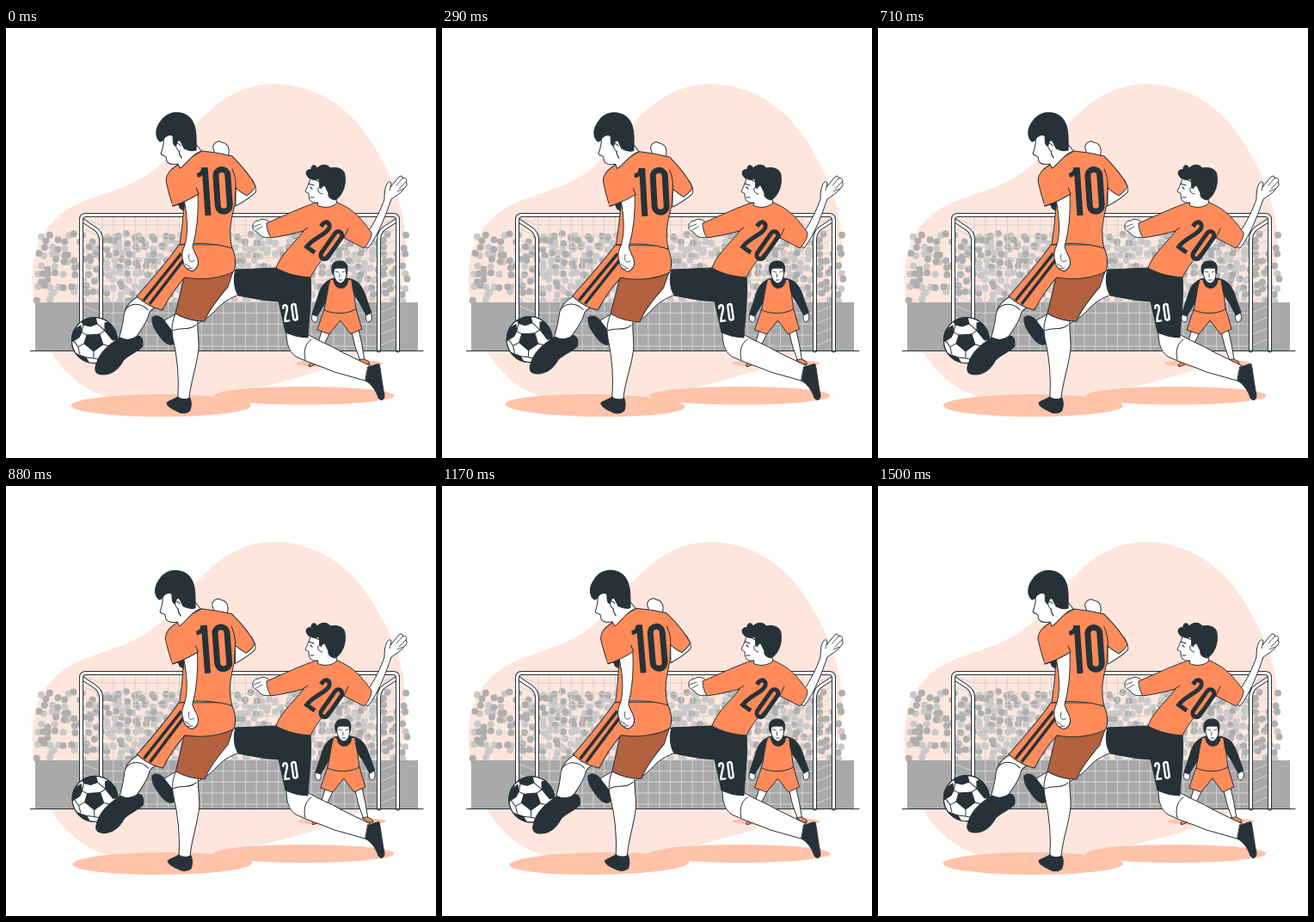
Animation, 500 px wide and 500 px high, one loop 1540 ms. Source, as an HTML page:

```html
<!DOCTYPE html>
<html lang="en">
<head>
<meta charset="utf-8">
<title>Football match</title>
<style>
  html, body { margin: 0; width: 100%; height: 100%; overflow: hidden; background: #fff; }
  svg { display: block; width: 100vw; height: 100vh; }
  .l { fill: none; }
  .w { fill: #fff; }
  .o { fill: #ff8b5a; }
  .d { fill: #263238; }
  .sh { fill: #ffc3aa; stroke: none; }
  .tube { fill: none; stroke: #263238; stroke-width: 5; }
  .tube.in { stroke: #fff; stroke-width: 3; }
  .num { fill: none; stroke: #263238; stroke-linejoin: miter; stroke-linecap: butt; }
</style>
</head>
<body>
<svg viewBox="0 0 500 500" stroke="#263238" stroke-width="1" stroke-linejoin="round" stroke-linecap="round">
  <defs>
    <symbol id="two" overflow="visible"><path d="M-4.500-11V-14C-4.500-21 4.500-21 4.500-13C4.500-5-4.500 7-4.500 18H7"/></symbol>
    <symbol id="zero" overflow="visible"><rect x="-4.500" y="-18.500" width="9" height="37" rx="4.500"/></symbol>
    <clipPath id="ballClip"><circle cx="103" cy="363.300" r="26.600"/></clipPath>
    <g id="frame">
      <path d="M88 223L103 233Q110.500 238 110.500 246V375M455 223L441 232Q433.500 237 433.500 246V375"/>
    </g>
    <path id="front" d="M87.500 375V223Q87.500 217.500 93 217.500H450Q455.500 217.500 455.500 223V375"/>
  </defs>

  <path fill="#ffe6dd" stroke="none" d="M312 65C368 65 409 102 431 143C452 180 465 214 465 255C465 300 452 345 420 372C390 395 345 405 290 419C238 433 172 441 122 430C84 421 58 392 45 361C34 336 29 306 31 281C34 244 53 216 91 201C125 188 158 182 184 154C216 120 249 65 312 65Z"/>

  <g id="crowd" stroke="none"></g>
  <path fill="#a9a9a9" stroke="none" d="M34 319H479V375H34Z"/>
  <path id="net" class="l" stroke="#d2d2d2" stroke-width="1"/>

  <use href="#frame" class="tube"/>
  <use href="#frame" class="tube in"/>
  <use href="#front" class="tube"/>
  <use href="#front" class="tube in"/>
  <path d="M28.500 375.500H485"/>

  <g id="keeper">
    <ellipse class="sh" cx="387" cy="390" rx="51" ry="4.500"/>
    <path class="w" d="M368 350L363 366L358 387L363 388L368 372L377 354ZM402 353L406 370L412 387L417 386L414 368L410 350Z"/>
    <path class="o" d="M358 386L352 392L353 394L360 391L363 388ZM411 386L417 391L423 391L422 388L417 385Z"/>
    <path class="w" d="M357 332C354 337 356 342 360 342C363 341 363 337 362 334ZM424 331C427 336 425 342 421 342C418 340 418 336 419 333Z"/>
    <path class="d" d="M382 291C370 294 366 301 363 312L356 333L362 335L371 320L377 306H402L411 319L419 334L425 331L418 311C414 300 410 293 397 291Z"/>
    <path class="o" d="M370 327L362 351L376 356L389 340L401 356L414 350L407 326Z"/>
    <path class="o" d="M377 293C374 303 374 308 372 318L370 328C382 333 396 333 407 327L405 310C403 303 403 299 402 293L398 292C398 306 381 306 381 292Z"/>
    <path class="w" d="M381 279C380 289 384 296 389 297C394 296 397 289 396 279L389 275Z"/>
    <path class="d" d="M380 286C377 277 380 271 388 271C396 270 399 277 396 286L395 279C390 280 386 278 382 280Z"/>
    <path class="l" d="M383 283L387 284M391 284L394 283M388 286V290M387 293H391" stroke-width=".8"/>
  </g>

  <g id="defender">
    <ellipse class="sh" cx="346.500" cy="427.500" rx="105" ry="10.500"/>
    <path class="w" d="M271 281L245 284L215 322L184 340L194 358C213 349 231 341 242 330C251 319 262 313 272 310Z"/>
    <path class="d" d="M170 337C173 333 179 335 182 338L193 352C196 358 198 364 195 367C191 371 184 366 179 359C174 352 169 346 170 337Z"/>
    <path class="w" d="M326 354C326 365 328 376 337 382C351 389 366 393 382 400L421 411L426 394L389 376C376 368 363 364 352 357Z"/>
    <path class="l" d="M355 362C347 367 346 378 348 386"/>
    <path class="d" d="M421 394C426 394 430 390 434 391C436 399 436 405 440 427C440 433 436 434 433 430C430 421 425 414 418 410Z"/>
    <path class="d" d="M314 279L267 281C264 291 265 303 270 311C285 314 300 317 317 318L325 354Q338 360 351 360C352 338 356 314 354 288Z"/>
    <path class="w" d="M421 237C428 227 436 211 440 199C440 190 441 184 444 180C447 177 449 180 447 185L457 173C460 171 462 173 461 175C465 173 467 177 465 179C468 182 464 186 462 188C458 193 453 195 448 199C442 216 434 239 421 256L410 250Z"/>
    <path class="l" d="M461 175L454 183M465 179L457 187M462 187L455 190M447 185L446 189" stroke-width=".8"/>
    <path class="w" d="M307 226C302 222 298 221 294 224C289 224 286 228 287 232C287 236 291 236 293 238C296 243 302 245 309 243Z"/>
    <path class="l" d="M288 231L296 228M291 235L298 231" stroke-width=".8"/>
    <path class="o" d="M361 203C344 208 322 219 303 227C303 233 305 239 308 244C322 242 335 239 346 236C336 250 320 262 314 279C326 286 340 289 354 290C361 275 376 259 393 244L416 256C421 251 425 245 425 238C414 223 406 211 383 202Z"/>
    <path class="l" d="M344 237L351 232M393 244L398 233"/>
    <path class="w" d="M354 174C353 181 349 187 348 190C349 192 352 191 352 193C352 200 354 204 363 203L362 206C369 210 380 209 385 203L381 188Z"/>
    <path class="d" d="M352 174C346 169 350 163 355 165C354 160 359 157 362 163C367 157 375 159 377 163C384 161 394 164 394 171C396 183 391 195 383 200C377 199 374 196 375 192L372 186C370 180 367 186 366 187C363 184 366 179 363 175C360 178 355 176 352 174Z"/>
    <path class="w" d="M367 187C361 181 361 193 368 193"/>
    <path class="l" d="M352 181L358 183M354 185L356 187M354 197H358" stroke-width="1.200"/>
    <g class="num" stroke-width="5" transform="translate(371 247.500) rotate(35)"><use href="#two" x="-9"/><use href="#zero" x="9"/></g>
    <g class="num" style="stroke:#fff" stroke-width="5" transform="translate(330.500 331) rotate(-8) scale(.5)"><use href="#two" x="-10"/><use href="#zero" x="10"/></g>
  </g>

  <g id="striker">
    <ellipse class="sh" cx="180.500" cy="439" rx="104.500" ry="13"/>
    <circle class="w" cx="103" cy="363.300" r="26.600"/>
    <g clip-path="url(#ballClip)">
      <path class="l" d="M94 357L88 354M109 356L115 352M113 368L121 370M102 376L102 384M91 367L84 371M88 354L90 345M106 344L115 352M79 364L84 371L86 379M121 370L119 379L111 386M93 383L102 384L111 386"/>
      <path class="d" d="M94 357L109 356L113 368L102 376L91 367ZM88 341L96 336H104L106 344L98 347L90 345ZM77 352L87 346L88 354L85 360L77 365ZM115 343L120 342L130 354V362L124 363L115 352ZM82 379L93 383L97 390L86 388ZM111 386L119 379L128 374L120 392Z"/>
    </g>
    <circle class="l" cx="103" cy="363.300" r="26.600"/>

    <path class="w" d="M198 330C193 340 192 350 194 360C199 381 202 401 200 431L213 432C214 413 222 394 224 374C225 363 222 352 223 338Z"/>
    <path class="l" d="M194 352C202 347 212 353 221 345"/>
    <path class="d" d="M200 429C205 433 210 432 214 430C216 435 216 440 214 445C209 449 203 448 198 445C193 443 188 440 187 436C190 433 196 432 200 429Z"/>
    <path class="w" d="M154 312C145 317 138 324 137 335C136 346 133 355 130 366L148 365C154 354 164 344 166 333C167 329 170 327 173 325Z"/>
    <path class="l" d="M138 329C144 319 157 319 165 328"/>
    <path class="d" d="M133 360C139 364 148 362 153 358C158 358 160 363 159 370C153 377 144 379 137 386C132 395 125 403 113 403C105 403 102 399 105 391C108 380 116 370 133 360Z"/>

    <path fill="#b3613f" d="M208 286L197 332Q212 341 231 341C235 329 246 315 258 301L267 274Z"/>
    <path class="o" d="M201 252C188 271 169 293 152 312Q166 325 182 328C189 314 199 300 208 290C229 294 252 290 265 283C268 274 267 263 261 252Z"/>
    <path d="M204 262L160 317M210 265L167 321" stroke-width="3.500" stroke-linecap="butt"/>

    <path class="w" d="M242 147C244 143 239 141 241 136C244 131 248 131 251 133C257 134 261 139 258 149Z"/>
    <path class="w" d="M286 176C290 183 292 188 290 191C284 197 276 202 267 207L267 187Z"/>
    <path class="o" d="M206 155C197 161 186 166 186 178C188 188 191 198 194 207L207 203C206 222 204 239 202 252C220 249 244 250 263 256C258 237 262 222 266 205L267 186C272 190 276 193 280 195C284 192 288 188 290 184C283 169 271 157 263 149C251 146 239 144 228 143Z"/>
    <path class="l" d="M267 187C268 177 266 171 263 164M207 203C211 195 210 188 206 183"/>
    <path class="d" d="M200 205L208 202L207 213L202 210Z" stroke="none"/>
    <path class="w" d="M207 200C211 220 212 238 208 252C204 260 204 266 206 271C206 277 211 281 216 283C222 281 225 275 223 269C222 264 218 260 217 254C222 236 224 215 223 192Z"/>
    <path class="l" d="M213 263C211 271 215 274 219 270M208 274L214 278M211 280L217 279" stroke-width=".8"/>
    <path class="o" d="M193 206C203 204 214 199 224 193L219 180L196 185Z" stroke="none"/>
    <path class="l" d="M194 207C204 204 214 199 224 193L221 186"/>

    <path class="w" d="M183 127C184 136 182 141 180 146C181 149 185 148 186 150C186 156 189 160 200 158L202 163C209 160 215 147 227 143L220 134L207 118Z"/>
    <path class="d" d="M179 132C173 127 173 117 180 108C186 99 197 96 207 100C219 105 221 118 221 129V142C216 144 211 142 207 140L204 134C202 128 198 131 198 137C194 137 194 132 194 126C191 123 187 124 184 128C183 130 181 132 179 132Z"/>
    <path class="w" d="M203 137C198 130 195 138 201 143"/>
    <path class="l" d="M201 143C201 148 203 149 204 151" stroke-width="1.200"/>
    <g class="num" stroke-width="7" transform="translate(242 189.500) rotate(-4)">
      <path d="M-18.500-19.500Q-11-20-10.500-28" stroke-width="5"/>
      <path d="M-9-28V28"/>
      <rect x="3" y="-24.500" width="14" height="49" rx="7"/>
    </g>
  </g>
</svg>
<script>
  const $ = id => document.getElementById(id);
  let seed = 11;
  const rnd = () => (seed = (seed * 16807) % 2147483647) / 2147483647;
  const dot = (x, y, r) => `M${x - r} ${y}a${r} ${r} 0 1 0 ${2 * r} 0a${r} ${r} 0 1 0 ${-2 * r} 0`;

  // Spectators: jittered rows in two greys, sparser outside the goal
  const tones = { "#c9c9c9": "", "#afafaf": "" };
  for (let y = 241; y < 319; y += 7.5) {
    for (let x = 36; x < 467; x += 7.5) {
      const inside = x > 110 && x < 434;
      if (rnd() < (inside ? 0.15 : 0.4)) continue;
      const tone = rnd() < (inside ? 0.65 : 0.35) ? "#c9c9c9" : "#afafaf";
      tones[tone] += dot(x + rnd() * 6 - 3, y + rnd() * 5 - 2.5, 4);
    }
  }
  $("crowd").innerHTML = Object.entries(tones)
    .map(([fill, d]) => `<path fill="${fill}" d="${d}"/>`).join("");

  // Goal net: back panel and slanted sides
  let net = "";
  for (let x = 112; x < 434; x += 12.8) net += `M${x} 220V375`;
  for (let y = 229; y < 375; y += 12.8) net += `M90 ${y - 8}L110 ${y}H434L453 ${y - 8}`;
  $("net").setAttribute("d", net);

  // Motion: 1.5 s cycles of straight segments, held at 24 pictures a second
  const LOOP = 1540, CYCLE = 1500, STEP = 1000 / 24;
  const sway = [[0, 0], [.25, 1], [.75, -1], [1, 0]];
  const shake = [[0, 0], [.1, -1], [.2, 2], [.3, -4], [.4, 4], [.5, -4], [.6, 4], [.7, -4], [.8, 2], [.9, -1], [1, 0]];

  function along(keys, p) {
    const i = keys.findIndex(([at]) => at > p);
    const [p0, v0] = keys[i - 1], [p1, v1] = keys[i];
    return v0 + (v1 - v0) * (p - p0) / (p1 - p0);
  }

  function draw(now) {
    const picture = Math.floor((now % LOOP + 5) / STEP);
    const p = (picture + .5) * STEP % CYCLE / CYCLE;
    $("striker").setAttribute("transform", `rotate(${along(sway, p)} 183 275)`);
    $("keeper").setAttribute("transform", `translate(${along(shake, p)})`);
  }

  const start = performance.now();
  function tick() {
    draw(performance.now() - start);
    requestAnimationFrame(tick);
  }
  tick();
</script>
</body>
</html>
```
